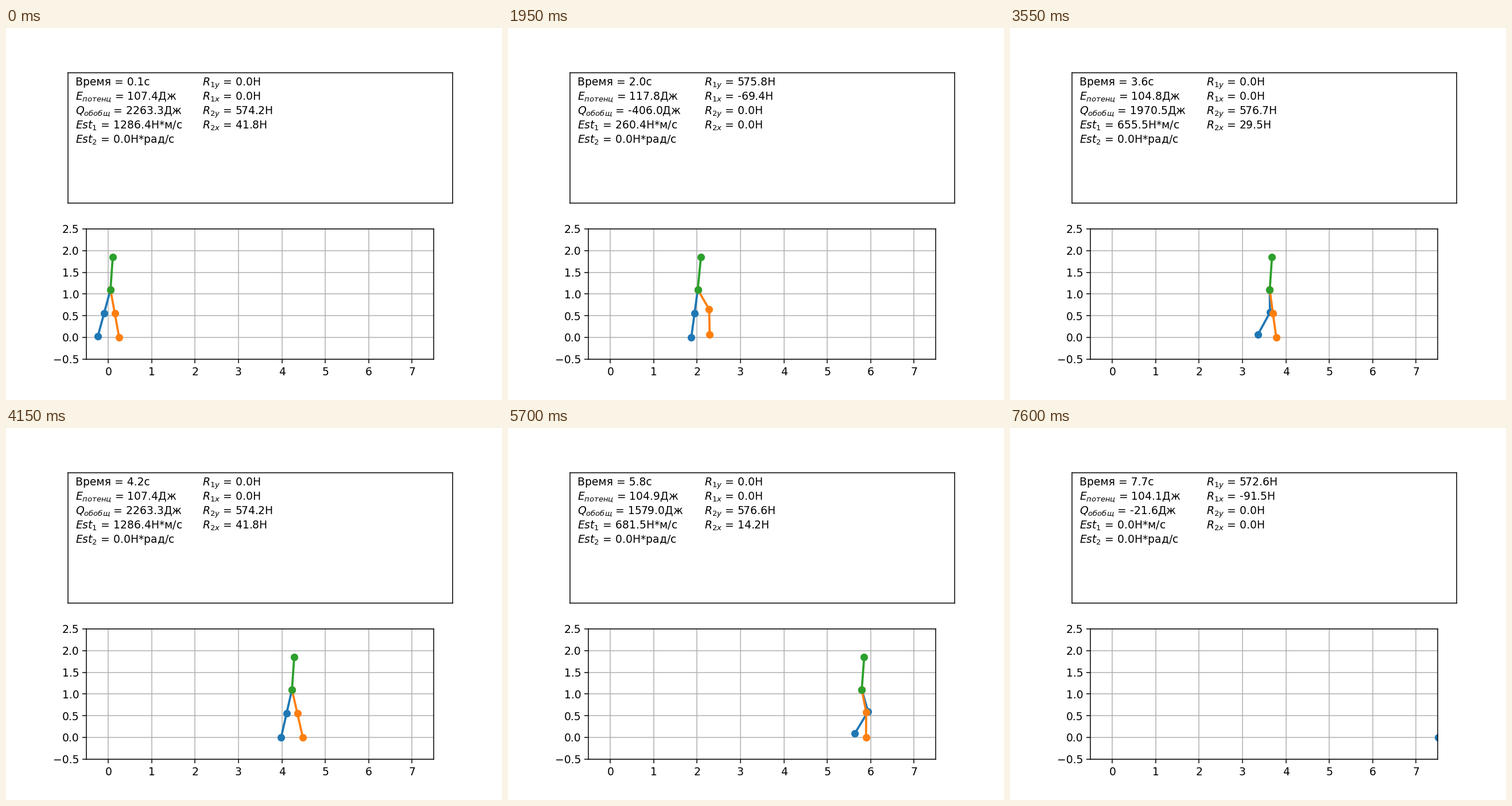
A matplotlib script for the animation above (7.65 s loop, 864x648 px).

```python
import numpy as np
import matplotlib.pyplot as plt
from matplotlib.animation import FuncAnimation

FRAMES, INTERVAL = 153, 50
DT = 0.05
STEP = 7            # frames per step, two steps per gait cycle
STRIDE = 0.7053     # distance covered in one gait cycle
SPEED = STRIDE / (2 * STEP * DT)
HIP_Y, TORSO = 1.1, 0.75
THIGH, SHANK = 0.525, 0.585
LIFT = 0.1

# Columns: potential energy, work, Est1, Est2, Rx, Ry, torso lean
FIRST_AT = [1, 2, 6]
FIRST = np.array([
    [107.4, 2263.3, 1286.4, 0, 41.8, 574.2, 0.052],
    [104.8, 1970.5, 655.5, 0, 29.5, 576.7, 0.052],
    [105.1, 404.3, 759.5, 0, -31.9, 576.2, 0.070],
])
SECOND_AT = [1, 5, 6]
SECOND = np.array([
    [100.9, 2120.6, 88.3, 90.4, -2.3, 575.5, 0.070],
    [117.8, -406.0, 260.4, 0, -69.4, 575.8, 0.072],
    [103.7, 1151.2, 0, 0, -92.7, 572.5, 0.095],
])
DRIFT = np.array([0.4, -1172.8, 0, 0, 1.2, 0.1, 0])

fig, (info, ax) = plt.subplots(2, 1, figsize=(6.4, 4.8), dpi=135)
info.set(xticks=[], yticks=[], xlim=(0, 1), ylim=(0, 1))
ax.set(xlim=(-0.5, 7.5), ylim=(-0.5, 2.5), aspect="equal",
       xticks=range(8), yticks=np.arange(-0.5, 2.6, 0.5))
ax.grid(True)

left_leg, = ax.plot([], [], "o-", lw=2, color="tab:blue")
right_leg, = ax.plot([], [], "o-", lw=2, color="tab:orange")
torso, = ax.plot([], [], "o-", lw=2, color="tab:green")


def column(x, rows):
    return [info.text(x, 0.9 - 0.11 * i, "") for i in range(rows)]


labels = column(0.02, 5) + column(0.35, 4)
FORMATS = [
    "Время = {:.1f}с",
    "$E_{{потенц}}$ = {:.1f}Дж",
    "$Q_{{обобщ}}$ = {:.1f}Дж",
    "$Est_1$ = {:.1f}Н*м/с",
    "$Est_2$ = {:.1f}Н*рад/с",
    "$R_{{1y}}$ = {:.1f}Н",
    "$R_{{1x}}$ = {:.1f}Н",
    "$R_{{2y}}$ = {:.1f}Н",
    "$R_{{2x}}$ = {:.1f}Н",
]


def swing(start, u):
    """Foot in the air: minimum-snap travel with a smooth lift."""
    s = u**4 * (35 - 84 * u + 70 * u**2 - 20 * u**3)
    return np.array([start + STRIDE * s, LIFT * np.sin(np.pi * u)**2])


def knee(hip, foot):
    """Bend forward, or take the middle of a fully stretched leg."""
    span = foot - hip
    d = np.hypot(*span)
    if d >= THIGH + SHANK:
        return (hip + foot) / 2
    along = (d**2 + THIGH**2 - SHANK**2) / (2 * d)
    out = np.sqrt(THIGH**2 - along**2)
    ux, uy = span / d
    return hip + along * np.array([ux, uy]) + out * np.array([-uy, ux])


def readings(n):
    second, s = divmod(n % (2 * STEP), STEP)
    if second:
        late = np.clip((n - 97) / 56, 0, 1)
        at, table = SECOND_AT, SECOND.copy()
        table[-1] += DRIFT * late
    else:
        at, table = FIRST_AT, FIRST
    return [np.interp(s, at, col) for col in table.T]


def update(i):
    n = i + 1
    t = DT * n
    cycle, k = divmod(n, 2 * STEP)
    second, s = divmod(k, STEP)
    u = s / STEP
    base = cycle * STRIDE

    if second:
        left = np.array([base - 0.25 + STRIDE, 0])
        right = swing(base + 0.25, u)
    else:
        left = swing(base - 0.25, u)
        right = np.array([base + 0.25, 0])

    energy, work, est1, est2, rx, ry, lean = readings(n)
    hip = np.array([SPEED * t, HIP_Y])
    for line, foot in ((left_leg, left), (right_leg, right)):
        line.set_data(*np.array([hip, knee(hip, foot), foot]).T)
    torso.set_data([hip[0], hip[0] + lean],
                   [HIP_Y, HIP_Y + np.sqrt(TORSO**2 - lean**2)])

    forces = [ry, rx, 0, 0] if second else [0, 0, ry, rx]
    values = [t, energy, work, est1, est2] + forces
    for label, form, value in zip(labels, FORMATS, values):
        label.set_text(form.format(value))
    return [left_leg, right_leg, torso, *labels]


anim = FuncAnimation(fig, update, frames=FRAMES, interval=INTERVAL,
                     repeat=True, repeat_delay=0)
plt.show()
```
